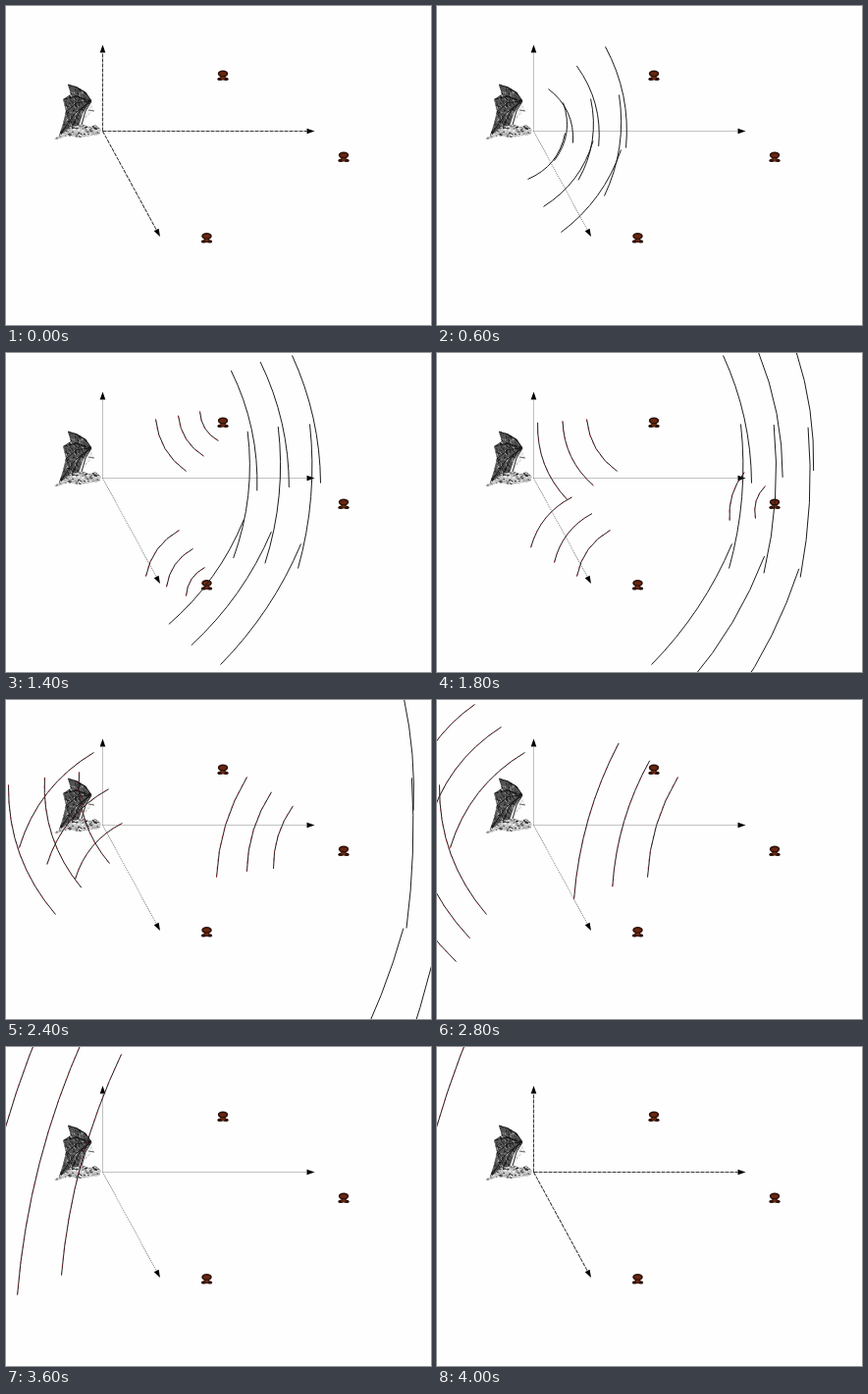
These frames come from a looping animation (433x325 px, 4200 ms). An HTML page with a canvas:

```html
<!DOCTYPE html>
<html lang="en">
<head>
<meta charset="utf-8">
<title>Echolocation</title>
<style>
html, body { margin: 0; width: 100%; height: 100%; overflow: hidden; background: #fefefe; }
canvas { display: block; }
</style>
</head>
<body>
<canvas id="stage" width="433" height="325"></canvas>
<script>
const ctx = document.getElementById('stage').getContext('2d');
const STEP = 200, STEPS = 21, LIFE = 3;

const callBulge = (d, n) => 8 * (1 - (n / 10.5) ** 4);
const nearBulge = d => 2 + d * 0.08;
const farBulge = d => 3.5 + d * 0.03;

// A train sends one front per step. Its chord (x0, y0, x1, y1) travels smoothly
// through a few poses, each given for the front number in "at".
const callAt = [0, 2, 6, 10], nearAt = [0, 2, 5, 7, 9], farAt = [0, 4, 8, 10];
const trains = [
  { start: 1, side: 1, bulge: callBulge, at: callAt, poses: [
    [113, 84, 138, 139], [171, 41, 192, 144], [291, 2, 320, 132], [444, -2, 446, 105]] },
  { start: 1, side: 1, bulge: callBulge, at: callAt, poses: [
    [128, 98, 119, 157], [185, 90, 170, 193], [309, 72, 297, 219], [448, 82, 445, 236]] },
  { start: 1, side: 1, bulge: callBulge, at: callAt, poses: [
    [130, 129, 92, 176], [187, 146, 126, 230], [300, 194, 218, 317], [440, 245, 400, 380]] },
  { start: 5, side: -1, bulge: nearBulge, echo: true, at: nearAt, poses: [
    [197, 59, 216, 89], [152, 67, 183, 120], [74, 73, 105, 166], [2, 86, 50, 218],
    [-60, 104, 19, 266]] },
  { start: 5, side: 1, bulge: nearBulge, echo: true, at: nearAt, poses: [
    [183, 247, 202, 218], [142, 227, 176, 180], [70, 182, 118, 125], [13, 150, 89, 53],
    [-30, 105, 38, 4]] },
  { start: 8, side: 1, bulge: farBulge, echo: true, at: farAt, poses: [
    [324, 168, 334, 135], [214, 180, 245, 78], [56, 232, 117, 7], [-36, 275, 38, -28]] }
];

// Hermite curve through the poses, with slopes taken from their neighbours
function poseAt({ at, poses }, n) {
  const last = at.length - 1;
  let i = 0;
  while (i < last - 1 && n > at[i + 1]) i++;
  const h = at[i + 1] - at[i], t = (n - at[i]) / h, u = 1 - t;
  return poses[0].map((_, k) => {
    const slope = j => {
      const a = Math.max(j - 1, 0), b = Math.min(j + 1, last);
      return (poses[b][k] - poses[a][k]) / (at[b] - at[a]);
    };
    const p = poses[i][k], q = poses[i + 1][k], s = (q - p) / h;
    return p + (q - p) * t + h * t * u * (u * (slope(i) - s) - t * (slope(i + 1) - s));
  });
}

function drawFront(train, n) {
  const [x0, y0, x1, y1] = poseAt(train, n);
  const dx = x1 - x0, dy = y1 - y0, d = Math.hypot(dx, dy);
  const k = 2 * train.side * train.bulge(d, n) / d;
  ctx.save();
  ctx.translate(0.5, 0.5);
  ctx.beginPath();
  ctx.moveTo(x0, y0);
  ctx.quadraticCurveTo((x0 + x1) / 2 + dy * k, (y0 + y1) / 2 - dx * k, x1, y1);
  ctx.strokeStyle = '#1c1c1c';
  ctx.lineWidth = 1;
  ctx.stroke();
  if (train.echo) {
    ctx.strokeStyle = 'rgba(190,20,30,0.55)';
    ctx.setLineDash([3, 5]);
    ctx.stroke();
  }
  ctx.restore();
}

function shape(points, fill) {
  ctx.beginPath();
  points.forEach(([x, y]) => ctx.lineTo(x, y));
  ctx.closePath();
  ctx.fillStyle = fill;
  ctx.fill();
}

function line(points, color) {
  ctx.strokeStyle = color;
  ctx.lineWidth = 0.9;
  ctx.beginPath();
  points.forEach(([x, y]) => ctx.lineTo(x, y));
  ctx.stroke();
}

function axis(x, y, strong) {
  const ox = 98.5, oy = 127.5, len = Math.hypot(x - ox, y - oy);
  ctx.save();
  ctx.translate(ox, oy);
  ctx.rotate(Math.atan2(y - oy, x - ox));
  ctx.setLineDash(strong ? [4, 1] : [1, 1]);
  line([[0, 0], [len - 8, 0]], strong ? '#222' : '#777');
  shape([[len, 0], [len - 8, -2.8], [len - 8, 2.8]], '#000');
  ctx.restore();
}

function bug(x, y) {
  const blob = (cx, cy, rx, ry) => {
    ctx.beginPath();
    ctx.ellipse(x + cx, y + cy, rx, ry, 0, 0, Math.PI * 2);
    ctx.fill();
  };
  ctx.fillStyle = '#2a1009';
  blob(0, -2, 5.2, 3.4);
  blob(0, 2, 2.8, 2.6);
  for (const s of [-1, 1]) blob(s * 3.2, 3.4, 2.5, 1.6);
  ctx.fillStyle = '#69260f';
  blob(0, -2, 3.6, 2);
  blob(0, 2.4, 2.2, 1.6);
}

function randomizer(seed) {
  return () => (seed = (seed * 16807) % 2147483647) / 2147483647;
}

// Short pen strokes clipped to an outline
function hatch(points, base, count, angle, tones, rnd) {
  ctx.save();
  shape(points, base);
  ctx.clip();
  for (let i = 0; i < count; i++) {
    const x = 49 + rnd() * 49, y = 79 + rnd() * 58;
    const a = angle + rnd() - 0.5, l = 1 + rnd() * 2;
    line([[x, y], [x + Math.cos(a) * l, y + Math.sin(a) * l]],
      tones[Math.floor(rnd() * tones.length)]);
  }
  ctx.restore();
}

function bat() {
  const rnd = randomizer(77);
  hatch([[63, 80], [72, 82], [81, 88], [87, 96], [87, 101], [80, 108], [76, 122],
    [66, 125], [54, 132], [58, 120], [61, 107], [58, 95], [66, 90]],
    '#555', 900, 1.1, ['#0c0c0c', '#1c1c1c', '#333', '#666', '#bbb'], rnd);
  hatch([[87, 97], [89, 107], [84, 111], [78, 121], [74, 122], [79, 108]],
    '#f2f2f2', 150, 2, ['#bbb', '#ddd', '#888'], rnd);
  hatch([[49, 135], [57, 131], [66, 123], [78, 121], [86, 123], [91, 121], [97, 126],
    [95, 131], [86, 132], [76, 134], [62, 132], [53, 136]],
    '#c8c8c8', 700, 0.1, ['#111', '#333', '#888', '#fff'], rnd);
  line([[63, 80], [72, 83], [81, 88], [87, 97], [81, 107], [77, 121]], '#111');
  for (const [x, y] of [[59, 95], [61, 108], [56, 130], [67, 124]])
    line([[86, 97], [(86 + x) / 2 - 1, (97 + y) / 2 - 4], [x, y]], '#111');
  line([[84, 106], [90, 107]], '#555');
}

function draw(step) {
  ctx.fillStyle = '#fefefe';
  ctx.fillRect(0, 0, 433, 325);
  bat();
  const strong = step === 0 || step >= 19;
  axis(98.5, 39.5, strong);
  axis(314.5, 127.5, strong);
  axis(157, 235, strong);
  bug(221, 71);
  bug(344, 154);
  bug(204.5, 236.5);
  for (const train of trains) {
    const newest = step - train.start, end = train.at[train.at.length - 1];
    for (let n = Math.max(0, newest - LIFE + 1); n <= Math.min(newest, end); n++)
      drawFront(train, n);
  }
}

let shown = -1;
function tick() {
  const step = Math.floor(performance.now() / STEP) % STEPS;
  if (step !== shown) draw(shown = step);
  requestAnimationFrame(tick);
}
tick();
</script>
</body>
</html>
```
